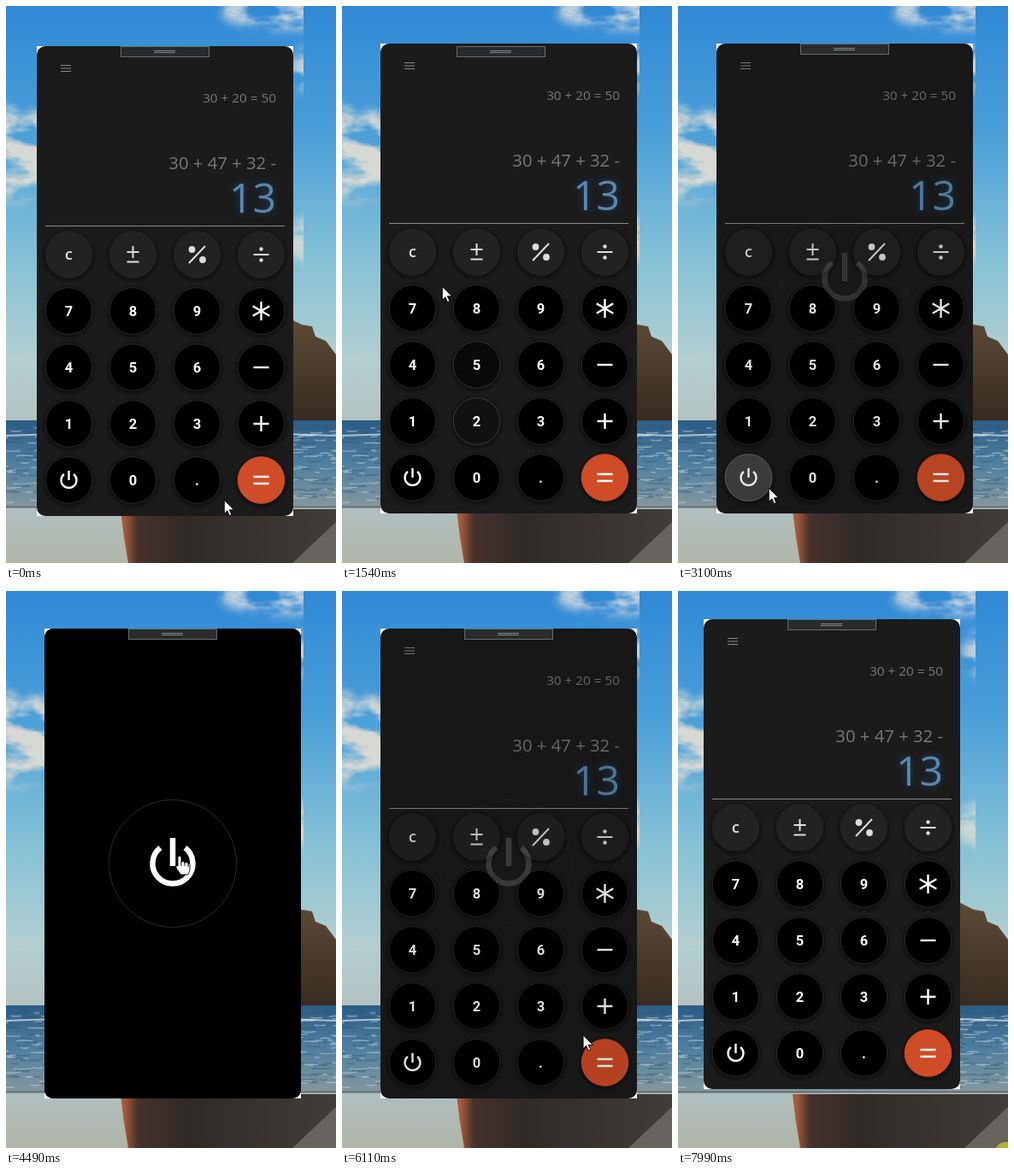
Animation of 386x652 px, one loop 8.06 s. Source, as an HTML page:

```html
<!DOCTYPE html>
<html lang="en">
<head>
<meta charset="utf-8">
<title>Calculator</title>
<style>
html, body { margin: 0; width: 100%; height: 100%; overflow: hidden; background: #3b8fd8; }
svg { display: block; position: absolute; left: 0; top: 0; }
.out { font-family: "Open Sans", "Noto Sans", sans-serif; text-anchor: end; fill: #787878; }
.key { font: 700 16.5px Roboto, sans-serif; text-anchor: middle; fill: #fff; }
.clear { font: 700 15px "Noto Sans Mono", monospace; fill: #ddd; }
.ico { fill: none; stroke: #fff; stroke-width: 2.4; }
.soft { stroke: #ddd; stroke-width: 2; }
.result { fill: #5a87ad; filter: drop-shadow(0 0 4px #20486a); }
</style>
</head>
<body>
<svg width="386" height="652" viewBox="0 0 386 652">
  <defs>
    <linearGradient id="sky" x2="0" y2="1">
      <stop offset="0" stop-color="#3089d6"/>
      <stop offset=".3" stop-color="#4a9fd8"/>
      <stop offset=".6" stop-color="#84c1d6"/>
      <stop offset=".85" stop-color="#b2cfd0"/>
      <stop offset="1" stop-color="#b4c2c0"/>
    </linearGradient>
    <linearGradient id="sea" x2="0" y2="1">
      <stop offset="0" stop-color="#2b5c86"/>
      <stop offset=".5" stop-color="#50809f"/>
      <stop offset="1" stop-color="#84989f"/>
    </linearGradient>
    <linearGradient id="sand" x2="0" y2="1">
      <stop offset="0" stop-color="#afc0c2"/>
      <stop offset="1" stop-color="#b0b6a8"/>
    </linearGradient>
    <linearGradient id="rock" x2="0" y2="1">
      <stop offset="0" stop-color="#5d4a36"/>
      <stop offset="1" stop-color="#362a20"/>
    </linearGradient>
    <linearGradient id="wet">
      <stop offset=".02" stop-color="#a5593a"/>
      <stop offset=".08" stop-color="#46322a"/>
      <stop offset=".3" stop-color="#302a26"/>
      <stop offset="1" stop-color="#403d38"/>
    </linearGradient>
    <radialGradient id="shade">
      <stop offset=".82" stop-opacity=".4"/>
      <stop offset="1" stop-opacity="0"/>
    </radialGradient>
    <filter id="fluff" filterUnits="userSpaceOnUse" width="386" height="480" color-interpolation-filters="sRGB">
      <feTurbulence type="fractalNoise" baseFrequency=".018 .04" numOctaves="4" seed="4"/>
      <feColorMatrix values="0 0 0 0 1  0 0 0 0 1  0 0 0 0 1  4 0 0 0 -1.3" result="wisps"/>
      <feGaussianBlur in="SourceGraphic" stdDeviation="7"/>
      <feComposite operator="in" in2="wisps"/>
    </filter>
  </defs>
  <g id="scene"></g>
  <g id="app"></g>
  <g id="bar">
    <rect x=".5" y=".5" width="103" height="12" fill="#292b2c" stroke="#666b6d"/>
    <path d="M39 5.5h25M39 7.5h25" stroke="#85898a"/>
  </g>
  <circle id="click" r="12" fill="#ff0" fill-opacity=".5"/>
  <g id="cursor" fill="#fff" stroke="#000" stroke-width=".9" stroke-linejoin="round">
    <path id="arrow" d="M.3 .3V16.2L3.9 12.8L6.4 18.5L8.9 17.4L6.4 11.8H11.5Z"/>
    <path id="hand" d="M-2 12V2a2 2 0 0 1 4 0V8a2 2 0 0 1 4 1a2 2 0 0 1 4 1a1 1 0 0 1 2 1V16c0 3-2 4-2 6H1c0-2-3-4-5-8c-1-2 1-3 2-2M2 8v4M6 9v3M10 10v3"/>
  </g>
</svg>
<script>
const LOOP = 8060, STEP = 77.5, R = 28;
const $ = id => document.getElementById(id);

// Backdrop: sky, clouds, headland, sea and wet sand
const cloud = (x, y, rx, ry, fill) => `<ellipse cx="${x}" cy="${y}" rx="${rx}" ry="${ry}" fill="${fill}"/>`;

let seed = 7;
const rand = () => (seed = seed * 16807 % 2147483647) / 2147483647;
const ripples = count => {
  let d = '';
  while (count--) {
    const x = rand() * 400 - 10, y = 490 + rand() * 94;
    d += `M${x.toFixed(1)} ${y.toFixed(1)}q6 ${(rand() * 4 - 2).toFixed(1)} ${(5 + rand() * 16).toFixed(1)} 0`;
  }
  return d;
};

$('scene').innerHTML = `
  <rect width="386" height="488" fill="url(#sky)"/>
  <g filter="url(#fluff)">
    ${cloud(330, 6, 80, 20, '#d5dade')}
    ${cloud(372, 74, 40, 30, '#c6d0d6')}
    ${cloud(10, 172, 60, 55, '#d6d8d4')}
    ${cloud(368, 274, 45, 28, '#d0d8d4')}
    ${cloud(10, 440, 60, 22, '#d3d0c2')}
  </g>
  <path d="M300 488V365H330L346 373L358 375L362 387L374 392L386 408V488Z" fill="url(#rock)"/>
  <rect y="485" width="386" height="102" fill="url(#sea)"/>
  <path d="${ripples(260)}" fill="none" stroke="#2c5470" stroke-width="1.6" opacity=".4"/>
  <path d="${ripples(260)}" fill="none" stroke="#cfdce2" stroke-width="1.4" opacity=".5"/>
  <path d="M0 503q193-8 386 0" fill="none" stroke="#dfe8ec" stroke-width="2" opacity=".7"/>
  <rect y="586" width="386" height="66" fill="url(#sand)"/>
  <path d="M0 586.5H386" stroke="#676c6a" stroke-width="2"/>
  <path d="M134 589H386V652H143L138 622Z" fill="url(#wet)"/>
  <path d="M335 652L386 604V652Z" fill="#66645c"/>`;

// Calculator, in window coordinates
const powerIcon = (r, top, end) =>
  `M${-.62 * r} ${-.785 * r}A${r} ${r} 0 1 0 ${.62 * r} ${-.785 * r}M0 ${top}V${end}`;
const ico = (d, c = '') => `<path class="ico ${c}" d="${d}"/>`;
const dot = (x, y, r) => `<circle cx="${x}" cy="${y}" r="${r}" fill="#ddd"/>`;
const faces = {
  '±': ico('M0-10V4M-7-3H7M-7 8.5H7', 'soft'),
  '%': ico('M-9.5 10L9.5-10', 'soft') + dot(-6, -6, 3.9) + dot(6.5, 6, 3.9),
  '÷': ico('M-9 0H9', 'soft') + dot(0, -6.5, 2.2) + dot(0, 6.5, 2.2),
  '*': ico('M0-11V11M-9.8-5.7L9.8 5.7M9.8-5.7L-9.8 5.7'),
  '-': ico('M-9 0H9'),
  '+': ico('M-9 0H9M0-9V9'),
  '=': ico('M-9-4H9M-9 4H9'),
  'P': ico(powerIcon(9, -11, 0)),
  'C': '<text class="key clear" y="5.5">C</text>'
};
const keys = [...'C±%÷789*456-123+P0.='].map((name, i) => ({
  name, row: i >> 2, x: 37.5 + i % 4 * 75, y: 244 + (i >> 2) * 66
}));
const drawKey = ({ name, row, x, y }) => {
  const fill = name === '=' ? '#cf4c26' : row ? '#000' : '#222';
  const ring = row && name !== '=' ? '#292929' : fill;
  return `<g transform="translate(${x} ${y})">
    <circle cy="1.5" r="33" fill="url(#shade)"/>
    <circle r="27.3" fill="${fill}" stroke="${ring}"/>
    <circle class="light" r="27.5" fill="#fff" stroke="#fff" opacity="0"/>
    ${faces[name] || `<text class="key" y="6">${name}</text>`}</g>`;
};

$('app').innerHTML = `
  <rect width="300" height="550" fill="#fff"/>
  <rect width="300" height="550" rx="10" fill="#1b1b1b"/>
  <path d="M28 22.5h12M28 26h12M28 29.5h12" stroke="#8a8a8a"/>
  <g class="out">
    <text x="280" y="66" font-size="15.3">30 + 20 = 50</text>
    <text x="280" y="144" font-size="20.3">30 + 47 + 32 -</text>
    <text class="result" x="280" y="195" font-size="48">13</text>
  </g>
  <path d="M10 210.5H290" stroke="#8c8c8c"/>
  ${keys.map(drawKey).join('')}
  <g id="cover">
    <rect width="300" height="550" rx="10"/>
    <g transform="translate(150 275)">
      <circle r="74.5" fill="none" stroke="#2b2b2b"/>
      <path d="${powerIcon(23.5, -30, 3)}" fill="none" stroke="#fff" stroke-width="6.5"/>
    </g>
  </g>`;
const lights = [...document.querySelectorAll('.light')];

// Key points: arrival time, x, y, rest
const pointer = [
  [0, 255, 578], [620, 150, 440, 280], [1160, 159, 437], [1390, 148, 476], [1540, 117, 328, 80],
  [1770, 147, 274, 80], [2090, 216, 300], [2470, 76, 558, 300], [3100, 106, 564, 80],
  [4260, 203, 310, 620], [5570, 297, 534, 80], [6230, 277, 515], [6420, 262, 504, 80],
  [6740, 226, 424, 150], [7360, 306, 506], [7820, 383, 657]
];
const frame = [[0, 36, 47, 900], [1160, 45, 44, 5070], [6420, 30, 33]];
const presses = [[930, 1170], [2710, 2870], [4570, 4730], [6230, 6430], [6740, 6890], [7980, LOOP]];

const clamp = v => Math.min(1, Math.max(0, v));
const ease = p => p * p * (3 - 2 * p);
const at = (line, t) => {
  const i = line.findLastIndex(k => k[0] <= t);
  const [t0, x0, y0, rest = 0] = line[i], [t1, x1, y1] = line[i + 1] || [LOOP, x0, y0];
  const p = ease(clamp((t - t0 - rest) / (t1 - t0 - rest)));
  return [x0 + (x1 - x0) * p, y0 + (y1 - y0) * p];
};
const cover = t => clamp((650 - Math.abs(t - 4590) + 980) / 1300);
const hit = t => {
  if (cover(t) > 0) return -1;
  const [x, y] = at(pointer, t), [wx, wy] = at(frame, t);
  return keys.findIndex(k => Math.hypot(x - wx - k.x, y - wy - k.y) < R);
};
// The toolbar snaps to the window only after a move has settled
const barAt = t => at(frame, t < 1650 ? 0 : t < 6470 ? 1700 : LOOP);
const move = (id, x, y) => $(id).setAttribute('transform', `translate(${x} ${y})`);
const show = (id, on) => $(id).style.display = on ? '' : 'none';

function draw(now) {
  const t = Math.floor((now % LOOP + 10) / STEP) * STEP % LOOP;
  const [x, y] = at(pointer, t), [wx, wy] = at(frame, t), [bx, by] = barAt(t);
  const fade = cover(t);
  move('app', Math.round(wx), Math.round(wy));
  move('bar', bx + 98, by);
  move('cursor', x, y);
  move('click', x, y);
  $('cover').setAttribute('opacity', fade);

  // Key highlights trail the pointer slightly
  const trail = [2, 3, 4].map(n => hit(Math.max(0, t - n * STEP)));
  lights.forEach((el, i) => {
    const pressed = keys[i].name === 'P' && t > 2700 && t < 3700 ? .26 : 0;
    const hover = trail.filter(h => h === i).length / 3 * .1;
    el.setAttribute('opacity', Math.max(hover, pressed));
  });

  const overSplash = fade === 1 && Math.hypot(x - wx - 150, y - wy - 275) < 75;
  const pointing = overSplash || hit(t) >= 0;
  show('hand', pointing);
  show('arrow', !pointing);
  show('click', presses.some(([a, b]) => t >= a && t < b));
}

const start = performance.now();
const tick = () => {
  draw(performance.now() - start);
  requestAnimationFrame(tick);
};
tick();
</script>
</body>
</html>
```
